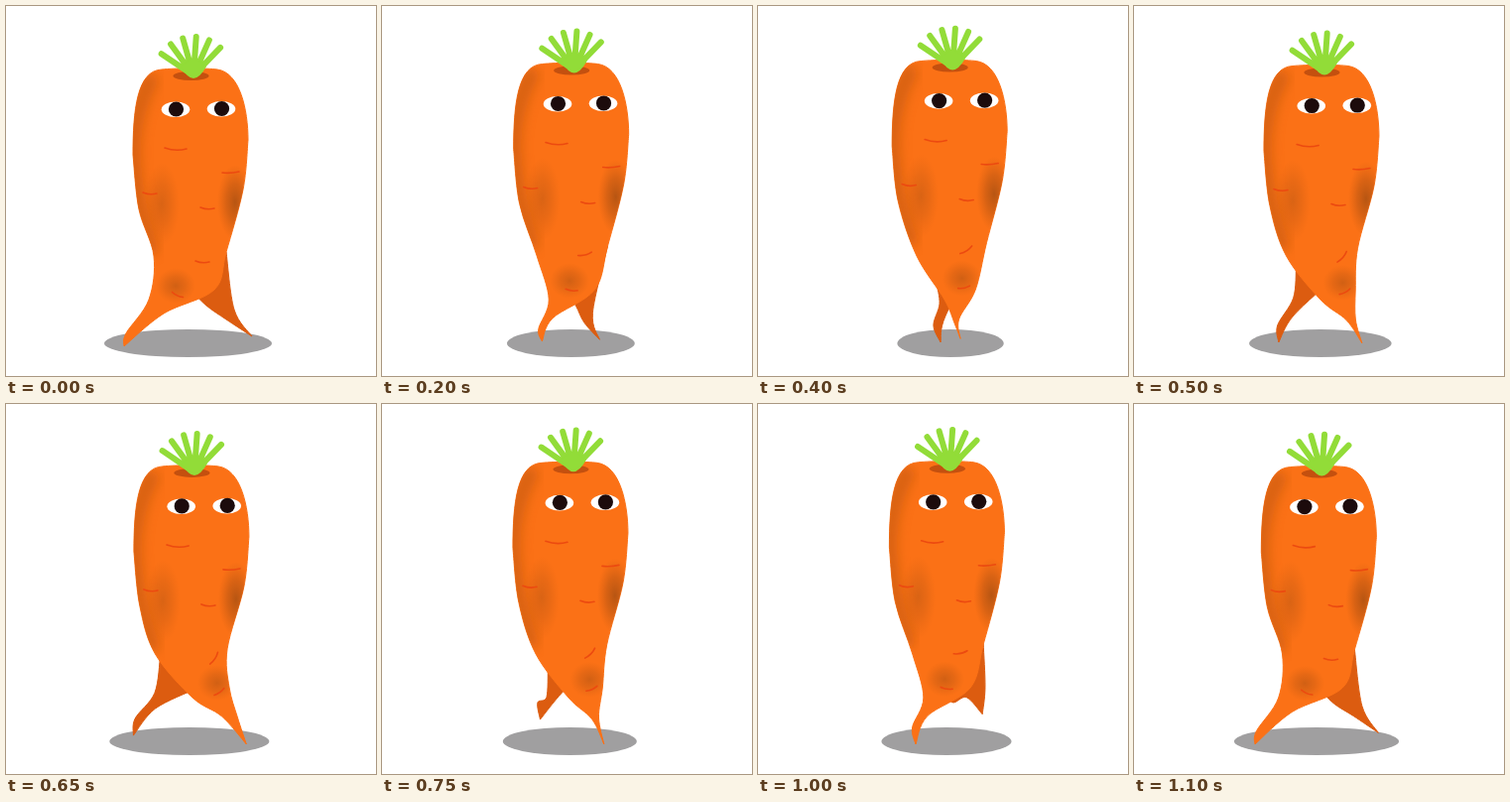
These frames come from a looping animation (373x373 px, 1150 ms). An HTML page:

```html
<!DOCTYPE html>
<html lang="en">
<head>
<meta charset="utf-8">
<title>Walking carrot</title>
<style>
  html, body { margin: 0; width: 100%; height: 100%; overflow: hidden; background: #fff; }
  svg { display: block; width: 100vw; height: 100vh; }
  .crack { fill: none; stroke: #ec4a10; stroke-width: 1.6; stroke-linecap: round; }
</style>
</head>
<body>
<svg viewBox="0 0 373 373">
  <defs>
    <clipPath id="skin"><path id="skinPath"/></clipPath>
    <filter id="soft" x="-50%" y="-20%" width="200%" height="140%"><feGaussianBlur stdDeviation="6"/></filter>
    <radialGradient id="blotch">
      <stop offset="0" stop-color="#8a4310" stop-opacity=".75"/>
      <stop offset=".5" stop-color="#9a4810" stop-opacity=".45"/>
      <stop offset="1" stop-color="#b0520f" stop-opacity="0"/>
    </radialGradient>
  </defs>

  <ellipse id="ground" cy="340" ry="14" fill="#a09fa0"/>
  <path id="farLeg" fill="#dc5c10" stroke="#dc5c10" stroke-linejoin="round"/>
  <path id="body" fill="#fb7116" stroke="#fb7116" stroke-linejoin="round"/>

  <g clip-path="url(#skin)">
    <g id="shade">
      <path d="M148 70Q127 105 127 150Q130 205 147 250" fill="none" stroke="#b4520f" stroke-width="17" opacity=".5" filter="url(#soft)"/>
      <ellipse cx="157" cy="200" rx="18" ry="42" fill="url(#blotch)" opacity=".4"/>
      <ellipse cx="231" cy="198" rx="18" ry="38" fill="url(#blotch)" opacity=".8"/>
    </g>
    <ellipse id="spot" rx="20" ry="18" fill="url(#blotch)" opacity=".5"/>
  </g>

  <path id="legCrack" class="crack" d="M-7-1Q0 2 7 0"/>
  <path id="spotCrack" class="crack" d="M-6 0Q0 2 6 0"/>

  <g id="top">
    <ellipse cx="186.500" cy="70.500" rx="18" ry="4.500" fill="#c4500f"/>
    <path id="leaves" fill="none" stroke="#92dc38" stroke-width="6" stroke-linecap="round"/>
    <path d="M176 61Q183 73 189 73Q195 73 202 61L189 52Z" fill="#92dc38"/>
    <path class="crack" d="M218 168Q226 169 235 167M196 203Q203 206 210 204M138 188Q145 191 152 189"/>
    <path id="mouth" class="crack" d="M160 143Q171 147 182 144"/>
    <g id="eyes">
      <g id="eye">
        <ellipse cx="171" cy="104.300" rx="14.300" ry="7.800" fill="#fff"/>
        <circle cx="171.500" cy="104" r="7.600" fill="#1c0b0c"/>
      </g>
      <use href="#eye" x="46" y="-.5"/>
    </g>
  </g>
</svg>
<script>
const STEP = 50, COUNT = 23, TURN = 12, REACH = 129;

// Distance from the far foot to the near foot, by frame.
const strideKeys = [[0, -129], [4, -58], [8, 20], [10, 84], [12, 128], [13, 115], [18, 0], [22, -124], [23, -129]];

const el = id => document.getElementById(id);
const set = (id, attrs) => {
  for (const name in attrs) el(id).setAttribute(name, attrs[name]);
};
const move = (id, x, y, turn = 0) =>
  set(id, { transform: `translate(${x} ${y}) rotate(${turn})` });

function strideAt(frame) {
  const next = strideKeys.findIndex(([time]) => time > frame);
  const [t0, a] = strideKeys[next - 1], [t1, b] = strideKeys[next];
  return a + (b - a) * (frame - t0) / (t1 - t0);
}

// Smooth curve segments through the points, starting from the first one.
function curve(points) {
  let d = "";
  for (let i = 0; i < points.length - 1; i++) {
    const b = points[i], c = points[i + 1];
    const a = points[i - 1] || b, e = points[i + 2] || c;
    const first = b.map((v, j) => v + (c[j] - a[j]) / 6);
    const second = c.map((v, j) => v - (e[j] - b[j]) / 6);
    d += `C${[...first, ...second, ...c].map(v => v.toFixed(2))}`;
  }
  return d;
}

function draw(frame) {
  const stride = strideAt(frame);
  const q = stride / REACH, ahead = Math.max(q, 0), behind = Math.max(-q, 0);
  const up = 1 - Math.abs(q);   // the body rises as the feet pass
  const nearSwing = frame < TURN ? up : 0, farSwing = up - nearSwing;
  const center = 183.5 + 12.5 * up, dx = 8.5 * up, dy = -10 * up;
  const at = (x, y) => [x + dx, y + dy];

  set("ground", { cx: center, rx: 84.5 - 36.5 * up });

  const hipLeft = [149 + 13 * up, 252];
  const hipRight = [222 + 10 * up, 248 - 11 * up];

  const fx = center - stride / 2 + 10 * farSwing;
  const fy = 339 - 6 * behind - 45 * farSwing;
  const farTip = [fx, fy];
  const farRight = [
    [hipRight[0] - 35 * ahead, hipRight[1] + 45 * ahead],
    [fx + 2 + 20 * q + 20 * farSwing, fy - 27],
    farTip
  ];
  const farLeft = [
    farTip,
    [fx - 9 + 12 * q - 5 * behind ** 2, fy - 17],
    [190 - 45 * ahead + 12 * behind, Math.min(302 - 12 * ahead, fy - 12)],
    [185 - 33 * ahead, 285 - 35 * ahead]
  ];
  set("farLeg", { d: `M${farRight[0]}${curve(farRight)}${curve(farLeft)}Z` });

  const nx = center + stride / 2;
  const nearTip = [nx, 343 - 9 * nearSwing];
  const right = [
    at(244, 135), at(239, 185), hipRight,
    [218 + 8 * q, 286],
    [nx - 10 * q + 30 * behind ** 2, 316 - 6 * behind ** 2],
    nearTip
  ];
  const left = [
    nearTip,
    [nx - 5 + 7 * behind ** 2 - 25 * ahead ** 2, 322 - 8 * q],
    [188 - 44 * behind, 296],
    hipLeft, at(134, 205), at(128, 150)
  ];
  const d = `M${right[0]}${curve(right)}${curve(left)}`
    + `C${[at(128, 105), at(132, 65), at(157, 64)]}`
    + `C${[at(170, 62.5), at(203, 62.5), at(213, 64)]}`
    + `C${[at(236, 67), at(244, 105), at(244, 135)]}Z`;
  set("body", { d });
  set("skinPath", { d });

  const glance = 2.5 * (1 - Math.cos(2 * Math.PI * frame / COUNT));
  const tilt = -32 - 32 * q;
  const spotX = 204 - 33 * behind + 10 * ahead, spotY = 282 - 9 * up;
  move("shade", dx, dy);
  move("top", dx, dy);
  move("eyes", glance, 0);
  move("mouth", glance * .25, 0);
  move("spot", spotX, spotY);
  move("legCrack", 204 + 6 * q + 6 * up, 258 - 14 * up, tilt);
  move("spotCrack", spotX + 2, spotY + 9, tilt + 25);
}

const blades = Array.from({ length: 6 }, (_, i) => {
  const angle = (20 * i - 56) * Math.PI / 180;
  const point = r => [189 + r * Math.sin(angle), 70 - r * Math.cos(angle)];
  return `M${point(8)}L${point(39)}`;
});
set("leaves", { d: blades.join("") });

const start = performance.now();
function tick() {
  draw(Math.floor((performance.now() - start) / STEP) % COUNT);
  requestAnimationFrame(tick);
}
tick();
</script>
</body>
</html>
```
